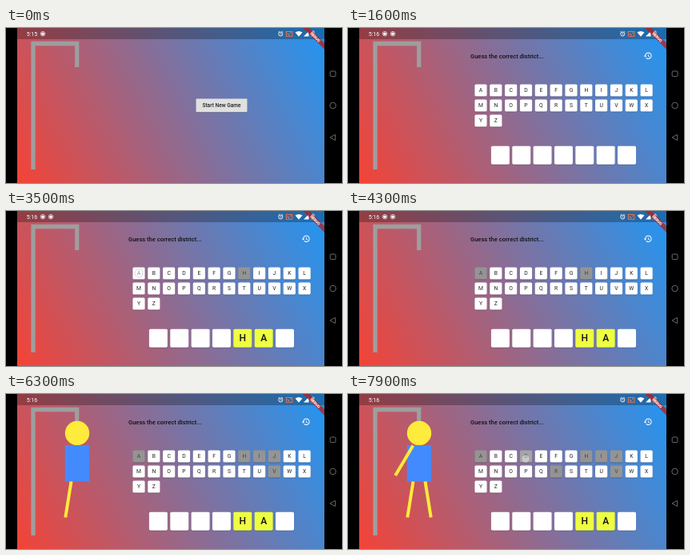
Animation of 420x194 px, one loop 8 s. Source, as an HTML page:

```html
<!DOCTYPE html>
<html lang="en">
<head>
<meta charset="utf-8">
<title>Word guessing game</title>
<style>
  html, body { margin: 0; width: 100%; height: 100%; overflow: hidden; background: #000; }
  svg { display: block; width: 420px; height: 194px; font-family: Roboto, sans-serif; }
  .mid { text-anchor: middle; }
  .key text { font-size: 6.8px; fill: #222; }
  .slot text { font-size: 12px; font-weight: 500; fill: #111; }
  .limb { stroke: #ffeb3b; stroke-width: 4; }
  .white { fill: #fff; }
  .line { fill: none; stroke: #fff; stroke-width: .9; }
  .nav { fill: none; stroke: #686868; stroke-width: 1; }
</style>
</head>
<body>
<svg viewBox="0 0 420 194">
  <defs>
    <linearGradient id="sky" gradientUnits="userSpaceOnUse" x1="14" y1="194" x2="398" y2="0">
      <stop stop-color="#f44336"/><stop offset="1" stop-color="#2196f3"/>
    </linearGradient>
    <clipPath id="screen"><path d="M14 0H398V194H14Z"/></clipPath>
  </defs>
  <rect width="420" height="194"/>
  <rect x="14" width="384" height="194" fill="url(#sky)"/>

  <path d="M34 177V19.5H88.7V49" fill="none" stroke="#9e9e9e" stroke-width="5.3"/>
  <g id="man">
    <circle cx="89" cy="49" r="15.2" fill="#ffeb3b"/>
    <rect x="73.7" y="64" width="30.5" height="45.5" fill="#448aff"/>
    <path class="limb" d="M81.5 109.5L74.3 154.5"/>
    <path class="limb" d="M96.5 109.5L103.7 154.5"/>
    <path class="limb" d="M81.3 64.5L59.2 102"/>
  </g>

  <g id="start">
    <rect x="237.5" y="89.3" width="64" height="17" rx="1" fill="#000" opacity=".18"/>
    <rect id="startFace" x="237.5" y="88.5" width="64" height="16.8" rx="1" fill="#e0e0e0"/>
    <text class="mid" x="269.5" y="99.3" font-size="6.6" font-weight="500" fill="#222">Start New Game</text>
  </g>

  <g id="game">
    <text x="153" y="37.5" font-size="7.55" font-weight="500" fill="#111">Guess the correct district...</text>
    <path class="white" transform="translate(369.2 29) scale(.475)" d="M13 3c-4.97 0-9 4.03-9 9H1l3.89 3.89.07.14L9 12H6c0-3.87 3.13-7 7-7s7 3.13 7 7-3.13 7-7 7c-1.93 0-3.68-.79-4.94-2.06l-1.42 1.42C8.27 19.99 10.51 21 13 21c4.97 0 9-4.03 9-9s-4.03-9-9-9zm-1 5v5l4.28 2.54.72-1.21-3.5-2.08V8H12z"/>
    <g id="keys"></g>
    <g id="slots"></g>
  </g>
  <circle id="touch" r="5" fill="#fff" fill-opacity=".4" stroke="#777" stroke-opacity=".35" stroke-width=".8"/>

  <rect x="14" width="384" height="14" fill="#000" opacity=".27"/>
  <text id="clock" class="white" x="25.7" y="9.8" font-size="7"></text>
  <g id="dots">
    <g><circle class="line" cx="46" cy="7.2" r="2.8" opacity=".75"/><circle class="white" cx="46" cy="7.2" r="1.8"/></g>
    <g><circle class="line" cx="56" cy="7.2" r="2.8" opacity=".75"/><circle class="white" cx="56" cy="7.2" r="1.8"/></g>
  </g>
  <g class="line">
    <circle cx="343.3" cy="7.5" r="2.5"/>
    <path d="M343.3 6V7.7L344.4 8.3M340.4 5.2L342 3.9M346.2 5.2L344.6 3.9" stroke-width=".7"/>
    <rect x="350.3" y="4.5" width="7.6" height="5.8" stroke="#ff7043"/>
    <path d="M351.5 7.2Q354 7.3 354.2 9.5M355 6.2H356.5" stroke="#ff8a65"/>
  </g>
  <path class="white" d="M361.5 5.6Q366 2.2 370.5 5.6L366 10.8ZM372 10.6L378.5 4V10.6ZM381.5 4.4H382.6V3.6H384.4V4.4H385.5V10.8H381.5Z"/>
  <g clip-path="url(#screen)">
    <g transform="translate(398 0) rotate(45)">
      <rect x="-20" y="13.2" width="40" height="5.7" fill="#b71c1c" fill-opacity=".75"/>
      <text class="mid white" y="17.8" font-size="4.8" font-weight="900">DEBUG</text>
    </g>
  </g>

  <g class="nav">
    <rect x="405.2" y="54" width="6.8" height="6.6" rx="1"/>
    <circle cx="408.6" cy="97" r="3.8"/>
    <path d="M411.6 133.4V140.6L405 137Z" stroke-linejoin="round"/>
  </g>
</svg>
<script>
  const LOOP = 8000, OPEN = 900;
  const $ = id => document.getElementById(id);
  const taps = [
    { at: 700, x: 272, y: 97 },
    { at: 2500, key: 'H', slot: 4 },
    { at: 3500, key: 'A', slot: 5 },
    { at: 4650, key: 'I', part: 0 },
    { at: 5200, key: 'J', part: 1, x: 336.5, y: 82 },
    { at: 6000, key: 'V', part: 2 },
    { at: 6950, key: 'R', part: 3 },
    { at: 7800, key: 'D', part: 4, x: 222, y: 81 }
  ];

  function tile(parent, kind, cx, cy, size, letter, drop) {
    const box = (dy, fill, alpha) => `<rect x="${cx - size / 2}" y="${cy - size / 2 + dy}"
      width="${size}" height="${size}" rx="1.6" fill="${fill}" opacity="${alpha}"/>`;
    parent.insertAdjacentHTML('beforeend', `<g class="${kind}">${box(.8, '#000', .2)}${box(0, '#fff', 1)}
      <text class="mid" x="${cx}" y="${cy + drop}">${letter}</text></g>`);
    const g = parent.lastElementChild;
    return { x: cx, y: cy, face: g.children[1], label: g.children[2] };
  }

  const keys = {};
  [...'ABCDEFGHIJKLMNOPQRSTUVWXYZ'].forEach((c, i) => {
    keys[c] = tile($('keys'), 'key', 166 + i % 12 * 18.83, 78 + Math.floor(i / 12) * 19, 15.2, c, 2.4);
  });
  const slots = Array.from({ length: 7 }, (_, i) =>
    tile($('slots'), 'slot', 190.4 + i * 26.35, 159.2, 23, '', 4.2));
  const parts = $('man').children;

  const show = (el, on) => { el.style.display = on ? '' : 'none'; };
  const clamp = v => Math.max(0, Math.min(1, v));

  function draw(t) {
    show($('start'), t < OPEN);
    show($('game'), t >= OPEN);
    $('startFace').setAttribute('fill', t > 620 ? '#cfcfcf' : '#e0e0e0');
    $('clock').textContent = t < OPEN ? '5:15' : '5:16';
    show($('dots'), t < 4800);
    show($('dots').children[1], t >= OPEN);

    let touch = null;
    for (const tap of taps) {
      const done = t >= tap.at, key = keys[tap.key];
      if (t >= tap.at - 100 && t < tap.at + 150) touch = tap;
      if (key) {
        const v = Math.round(255 - 107 * clamp((t - tap.at) / 120));
        key.face.setAttribute('fill', `rgb(${v},${v},${v})`);
        key.label.style.fill = done ? '#444' : '';
      }
      if ('part' in tap) show(parts[tap.part], done);
      if ('slot' in tap) {
        const s = slots[tap.slot];
        s.face.setAttribute('fill', done ? '#eeff41' : '#fff');
        s.label.textContent = done ? tap.key : '';
      }
    }
    show($('touch'), touch);
    if (touch) {
      const spot = touch.x ? touch : keys[touch.key];
      $('touch').setAttribute('cx', spot.x);
      $('touch').setAttribute('cy', spot.y);
    }
  }

  const begin = performance.now();
  function tick() {
    draw((performance.now() - begin) % LOOP);
    requestAnimationFrame(tick);
  }
  tick();
</script>
</body>
</html>
```
